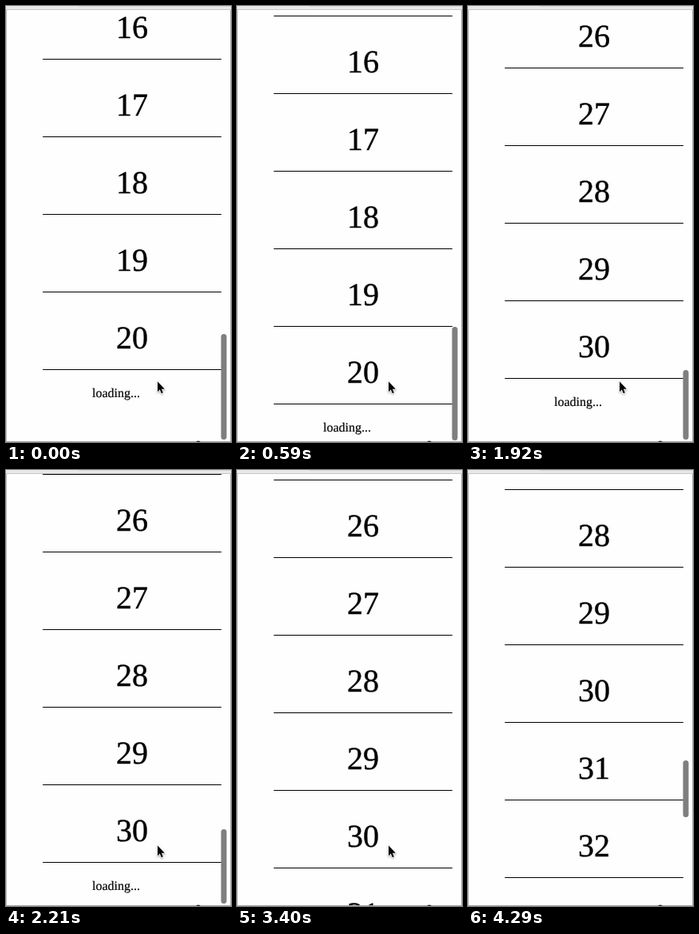
An HTML page that plays this animation: 282 px wide and 545 px high, repeating every 4.84 s.

```html
<!DOCTYPE html>
<html lang="en">
<head>
<meta charset="utf-8">
<title>Infinite list</title>
<style>
  html, body { margin: 0; width: 100%; height: 100%; overflow: hidden; background: #fefefe; }
  svg { display: block; }
  text {
    font-family: "Liberation Serif", "Times New Roman", Times, serif;
    text-rendering: geometricPrecision;
    stroke: #000;
  }
  .row text { font-size: 40px; text-anchor: middle; stroke-width: .4px; }
  #loading { font-size: 16px; stroke-width: .2px; }
  #cursor { filter: drop-shadow(0 1px 1px rgba(0, 0, 0, .35)); }
</style>
</head>
<body>
<svg width="282" height="545" viewBox="0 0 282 545">
  <defs>
    <clipPath id="view"><rect x="1" y="5" width="280" height="539"/></clipPath>
  </defs>
  <rect width="282" height="545" fill="#fefefe"/>

  <g clip-path="url(#view)">
    <g id="list"><text id="loading" x="108">loading...</text></g>
  </g>

  <rect id="bar" x="269.5" width="7" rx="3.5" fill="#7f7f7f"/>

  <!-- window edges -->
  <rect width="282" height="4" fill="#e8e8e8"/>
  <rect x="91" width="191" height="1" fill="#d4d4d4"/>
  <rect y="4" width="282" height="1" fill="#c6c6c6"/>
  <rect y="5" width="1" height="540" fill="#bcbcbc"/>
  <rect x="281" y="5" width="1" height="540" fill="#b0b0b0"/>
  <rect y="544" width="282" height="1" fill="#a6a6a6"/>
  <ellipse cx="241" cy="545" rx="2.5" ry="1.6" fill="#222"/>

  <path id="cursor" d="M0 0V12.7L2.8 10.1 4.8 14.7 6.8 13.8 4.9 9.2H8.8Z"
        stroke="#fff" stroke-width="1.4" paint-order="stroke"/>
</svg>
<script>
const LOOP = 4840, STEP = 148.15, LEAD = 13;  // ms; the picture moves in even steps
const PITCH = 97, REBOUND = .265;
const TRACK_TOP = 6, TRACK = 536;
const $ = id => document.getElementById(id);
const list = $('list'), loading = $('loading'), bar = $('bar'), cursor = $('cursor');

const clamp = v => Math.min(1, Math.max(0, v));
const easeOut = p => 1 - (1 - clamp(p)) ** 1.5;
const bounce = (size, steps) => size * REBOUND ** steps;
const lineY = n => 12 + PITCH * n;
const endOf = count => PITCH * (count - 5);   // furthest scroll of a list

const rows = Array.from({ length: 40 }, (_, i) => {
  const n = i + 1, y = lineY(n);
  const row = document.createElementNS('http://www.w3.org/2000/svg', 'g');
  row.setAttribute('class', 'row');
  row.innerHTML = `<text x="158" y="${y - 26}">${n}</text>` +
    `<rect x="46" y="${y}" width="224" height="1"/>`;
  list.append(row);
  return row;
});

function scrollAt(k) {
  if (k < 11) return endOf(20) + bounce(43, k);
  if (k < 14) return endOf(20) + 1002 * easeOut((k - 11) / 2);
  if (k < 25) return endOf(30) + bounce(26, k - 14);
  return endOf(30) + 182 * easeOut((k - 25) / 2);
}

const countAt = k => k < 9 ? 20 : k < 23 ? 30 : 40;

// The bar fades after each rest and returns with the next scroll.
const barAlpha = k => k < 12 ? clamp(8 - k) : k < 26 ? clamp(21.5 - k) : 1;

function drawBar(k, scroll, count) {
  const part = scroll / endOf(count);
  const over = Math.max(0, scroll - endOf(count));
  const full = 2830 / count;
  const height = Math.round(full - over * .23);
  const top = TRACK_TOP + Math.round((TRACK - full) * clamp(part));
  const bottom = over ? TRACK_TOP + TRACK : top + height;
  bar.setAttribute('y', bottom - height);
  bar.setAttribute('height', height);
  bar.setAttribute('opacity', barAlpha(k));
}

function draw(ms) {
  const k = Math.floor((ms % LOOP + LEAD) / STEP);
  const scroll = Math.round(scrollAt(k)), count = countAt(k);

  list.setAttribute('transform', `translate(0 ${-scroll})`);
  loading.setAttribute('y', lineY(count) + 35);
  rows.forEach((row, i) => row.style.display = i < count ? '' : 'none');
  drawBar(k, scroll, count);

  cursor.setAttribute('transform', k < 28 ? 'translate(190 469.5)' : 'translate(222 509.5)');
  cursor.setAttribute('opacity', k < 29 ? 1 : 0);
}

const start = performance.now();
function tick() {
  draw(performance.now() - start);
  requestAnimationFrame(tick);
}
tick();
</script>
</body>
</html>
```
